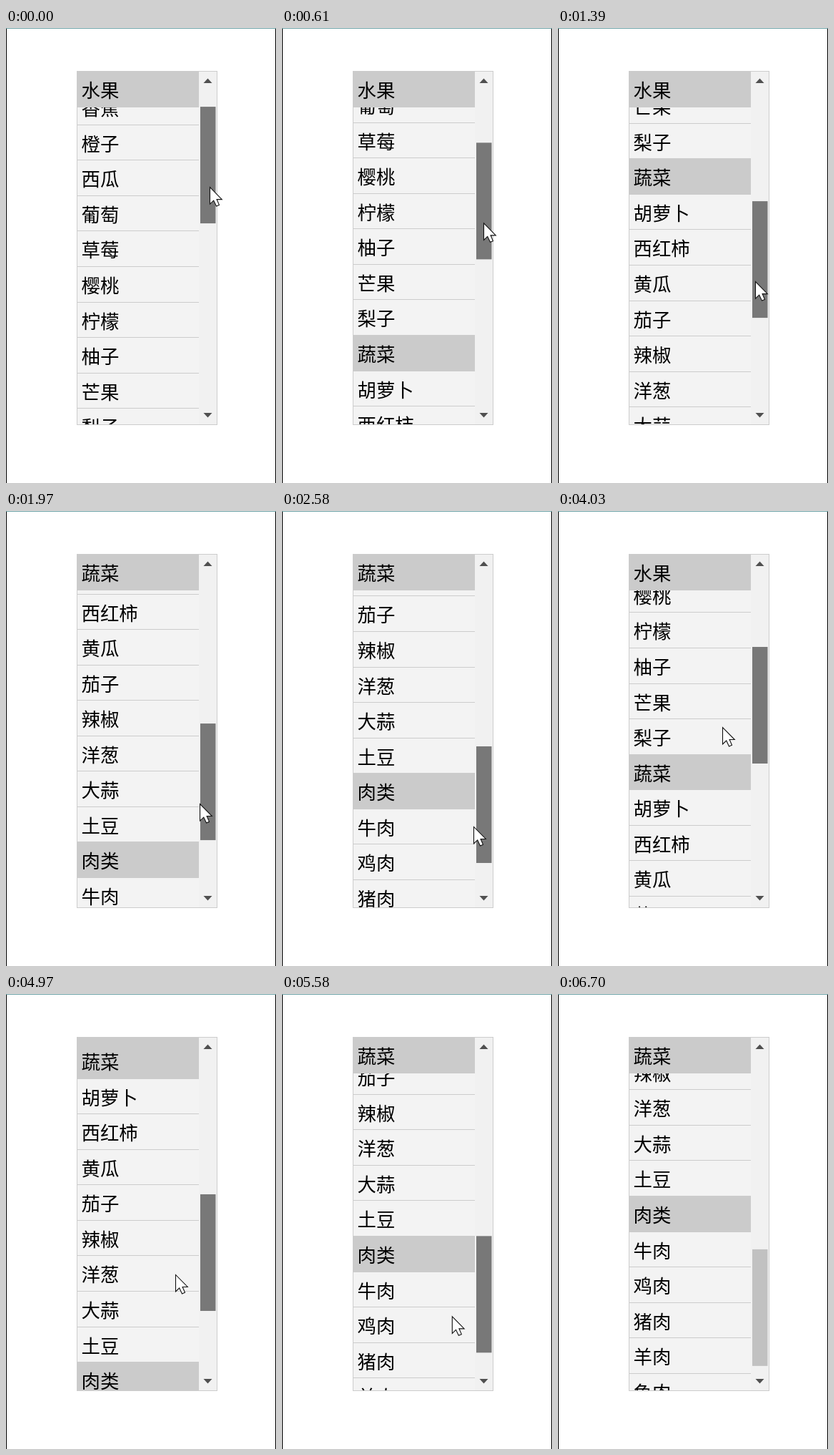
An HTML page with a canvas for the animation above (7.09 s loop, 378 px wide and 636 px high).

```html
<!DOCTYPE html>
<html lang="zh-CN">
<head>
<meta charset="utf-8">
<style>
  html, body { margin: 0; width: 100%; height: 100%; overflow: hidden; background: #fff; }
  canvas { display: block; width: 378px; height: 636px; }
</style>
</head>
<body>
<canvas id="stage" width="378" height="636"></canvas>
<script>
const ctx = document.getElementById('stage').getContext('2d');
const LOOP = 7090;
const ROW = 49.55;
const LIST = { x: 100, y: 61, w: 170, h: 493 };
const FONT = '26.4px "Noto Sans CJK SC", "Noto Sans CJK", sans-serif';

const sections = [
  '水果 苹果 香蕉 橙子 西瓜 葡萄 草莓 樱桃 柠檬 柚子 芒果 梨子',
  '蔬菜 胡萝卜 西红柿 黄瓜 茄子 辣椒 洋葱 大蒜 土豆',
  '肉类 牛肉 鸡肉 猪肉 羊肉 鱼肉'
].map(s => s.split(' '));

// time, scroll offset, pointer x
const keys = [
  [0, 73.65, 285], [610, 225.3, 282], [1390, 472, 276],
  [2580, 734.3, 268], [2920, 734.3, 268],
  [4030, 315, 230], [4220, 315, 230],
  [4970, 586.2, 237], [6000, 818.5, 238], [LOOP, 818.5, 238]
];
const RELEASE = 6360, GONE = 6690;

const secant = (i, c) => (keys[i + 1][c] - keys[i][c]) / (keys[i + 1][0] - keys[i][0]);

function slope(i, c) {
  if (i === 0) return secant(0, c);
  if (i === keys.length - 1) return 0;
  const a = secant(i - 1, c), b = secant(i, c);
  return a * b > 0 ? 2 * a * b / (a + b) : 0;
}

// Monotone cubic interpolation of one column
function valueAt(t, c) {
  let i = 0;
  while (i < keys.length - 2 && t >= keys[i + 1][0]) i++;
  const [p, q] = [keys[i], keys[i + 1]];
  const d = q[0] - p[0], u = (t - p[0]) / d, v = 1 - u;
  return v * v * (1 + 2 * u) * p[c] + u * u * (3 - 2 * u) * q[c]
    + d * u * v * (v * slope(i, c) - u * slope(i + 1, c));
}

function rect(color, x, y, w, h) {
  ctx.fillStyle = color;
  ctx.fillRect(x, y, w, h);
}

function polygon(color, points) {
  ctx.beginPath();
  points.forEach(([x, y]) => ctx.lineTo(x, y));
  ctx.closePath();
  ctx.fillStyle = color;
  ctx.fill();
}

function drawRow(label, top, isHeader) {
  if (top > LIST.h || top < -ROW) return;
  const y = LIST.y + Math.round(top);
  const end = LIST.y + Math.round(top + ROW);
  if (isHeader) rect('#cbcbcb', LIST.x, y, LIST.w, end - y);
  else rect('#ccc', LIST.x, end - 1, LIST.w, 1);
  ctx.fillStyle = '#000';
  ctx.fillText(label, 105.5, y + 36);
}

function drawList(scroll) {
  ctx.save();
  ctx.beginPath();
  ctx.rect(LIST.x, LIST.y, LIST.w, LIST.h);
  ctx.clip();
  ctx.font = FONT;
  let top = -scroll;
  for (const rows of sections) {
    const end = top + rows.length * ROW;
    for (let i = 1; i < rows.length; i++) drawRow(rows[i], top + i * ROW, false);
    drawRow(rows[0], Math.max(top, Math.min(0, end - ROW)), true);
    top = end;
  }
  ctx.restore();
}

function drawScrollbar(thumb, held) {
  rect('#f1f1f1', 270, LIST.y, 25, LIST.h);
  rect(held ? '#787878' : '#c1c1c1', 272, thumb, 21.5, 163);
  polygon('#505050', [[276.5, 77], [282.5, 70.5], [288.5, 77]]);
  polygon('#505050', [[276.5, 538], [282.5, 544.5], [288.5, 538]]);
}

function drawPointer(x, y) {
  ctx.save();
  ctx.translate(x, y);
  polygon('#fff', [[0, 0], [0, 23.5], [5.2, 18.5], [9, 26.5], [13, 24.8], [9.6, 17], [16.8, 17]]);
  ctx.strokeStyle = '#111';
  ctx.lineWidth = 1.1;
  ctx.stroke();
  ctx.restore();
}

function draw(t) {
  const scroll = valueAt(t, 1);
  const thumb = 110 + (scroll - 73.65) / 3.017;

  rect('#fff', 0, 0, 378, 636);
  rect('#000', 0, 0, 1, 636);
  rect('#000', 377, 0, 1, 636);
  rect('#6fa5a8', 0, 0, 378, 1);

  rect('#ccc', 99, 60, 197, 495);
  rect('#f3f3f3', LIST.x, LIST.y, LIST.w, LIST.h);
  drawList(scroll);
  drawScrollbar(thumb, t < RELEASE + 30);

  if (t < GONE) {
    const u = Math.max(0, (t - RELEASE) / (GONE - RELEASE)) ** 1.3;
    drawPointer(valueAt(t, 2) + 58 * u + 0.5, thumb + 112 + 172 * u + 0.5);
  }
}

const start = performance.now();
function frame() {
  draw((performance.now() - start) % LOOP);
  requestAnimationFrame(frame);
}
frame();
</script>
</body>
</html>
```
